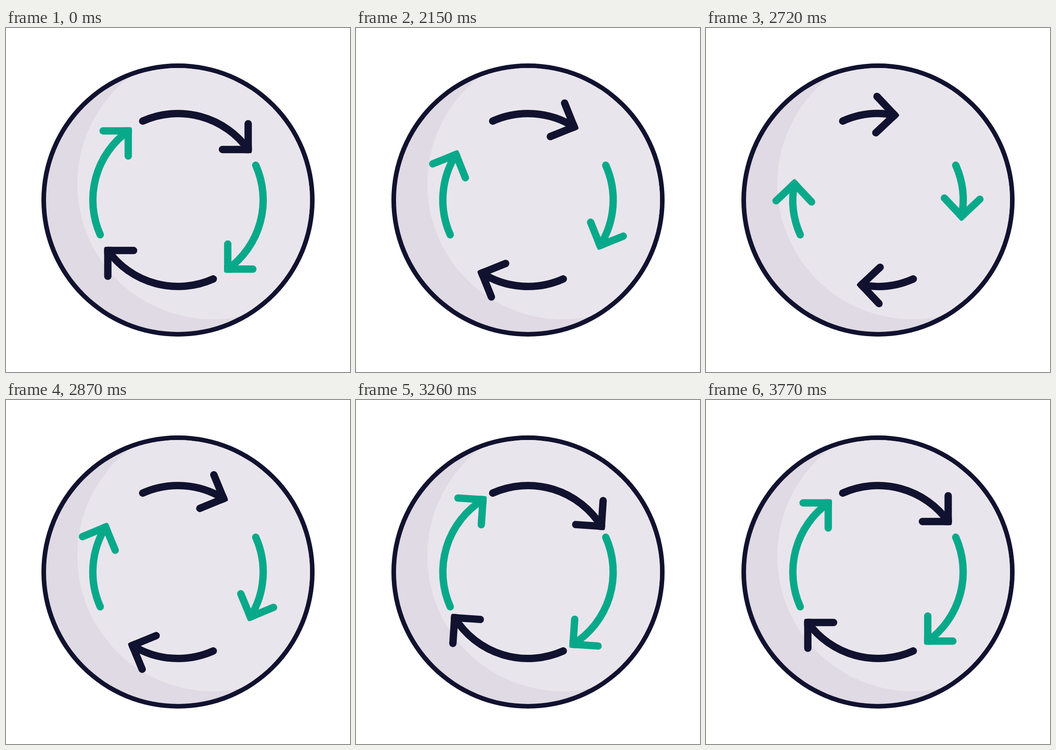
Write an HTML page with a canvas that moves like this. It is 748 by 748 pixels and loops after 3.83 s.

```html
<!DOCTYPE html>
<html lang="en">
<head>
<meta charset="utf-8">
<title>Cycle arrows</title>
<style>
  html, body { margin: 0; width: 100%; height: 100%; overflow: hidden; background: #fff; }
  canvas { display: block; width: 748px; height: 748px; }
</style>
</head>
<body>
<canvas id="stage" width="748" height="748"></canvas>
<script>
const ctx = document.getElementById('stage').getContext('2d');
const LOOP = 3830, STEP = 30, REST_END = 2030;
const MID = 374, LINE = 16, RAD = Math.PI / 180;
const NAVY = '#11122f', GREEN = '#08a98a', LIGHT = '#e9e5ec', SHADE = '#dfdae3';
const TAIL = -24.1, TIP = 54.25;

const STYLES = [
  { color: NAVY, radius: 188, arm: 56 },
  { color: GREEN, radius: 185.2, arm: 54.6 }
];

const smooth = x => x * x * (3 - 2 * x);
const mix = (a, b, u) => a + (b - a) * u;

// Degrees the heads have travelled from rest: pull back, overshoot, settle.
function travel(t) {
  const start = 2000, turn = 2560, peak = 3148, end = 3770;
  const back = -53.7, over = 4.2;
  if (t < REST_END || t >= end) return 0;
  if (t < turn) return back * Math.sin((t - start) / (turn - start) * Math.PI / 2);
  if (t < peak) return mix(back, over, smooth((t - turn) / (peak - turn)));
  return mix(over, 0, smooth((t - peak) / (end - peak)));
}

function disc(x, y, r, color) {
  ctx.fillStyle = color;
  ctx.beginPath();
  ctx.arc(x, y, r, 0, 2 * Math.PI);
  ctx.fill();
}

function badge() {
  disc(MID, MID, 297, NAVY);
  ctx.save();
  ctx.beginPath();
  ctx.arc(MID, MID, 287, 0, 2 * Math.PI);
  ctx.clip();
  disc(MID, MID, 290, SHADE);
  disc(449.5, 339, 294.5, LIGHT);
  ctx.restore();
}

function line(x1, y1, x2, y2) {
  ctx.beginPath();
  ctx.moveTo(x1, y1);
  ctx.lineTo(x2, y2);
  ctx.stroke();
}

function arrow(turns, { color, radius, arm }, shift) {
  const half = LINE / 2;
  ctx.save();
  ctx.translate(MID, MID);
  ctx.rotate(turns * Math.PI / 2);
  ctx.strokeStyle = ctx.fillStyle = color;
  ctx.lineWidth = LINE;
  ctx.lineCap = 'round';

  ctx.beginPath();
  ctx.arc(0, 0, radius, (TAIL - 90) * RAD, (TIP + shift - 90) * RAD);
  ctx.stroke();

  ctx.rotate(shift * RAD);
  ctx.translate(radius * Math.sin(TIP * RAD), -radius * Math.cos(TIP * RAD));
  line(0, 0, -arm, 0);
  line(0, 0, 0, -arm);
  ctx.beginPath();
  ctx.roundRect(-half, -half, LINE, LINE, [0, 0, 4, 0]);
  ctx.fill();
  ctx.restore();
}

function draw(now) {
  const t = now % LOOP;
  const tick = REST_END + Math.floor((t - REST_END) / STEP) * STEP;
  const shift = travel(tick);
  ctx.fillStyle = '#fff';
  ctx.fillRect(0, 0, 748, 748);
  badge();
  for (let i = 0; i < 4; i++) arrow(i, STYLES[i % 2], shift);
}

const began = performance.now();
function loop() {
  draw(performance.now() - began);
  requestAnimationFrame(loop);
}
loop();
</script>
</body>
</html>
```
